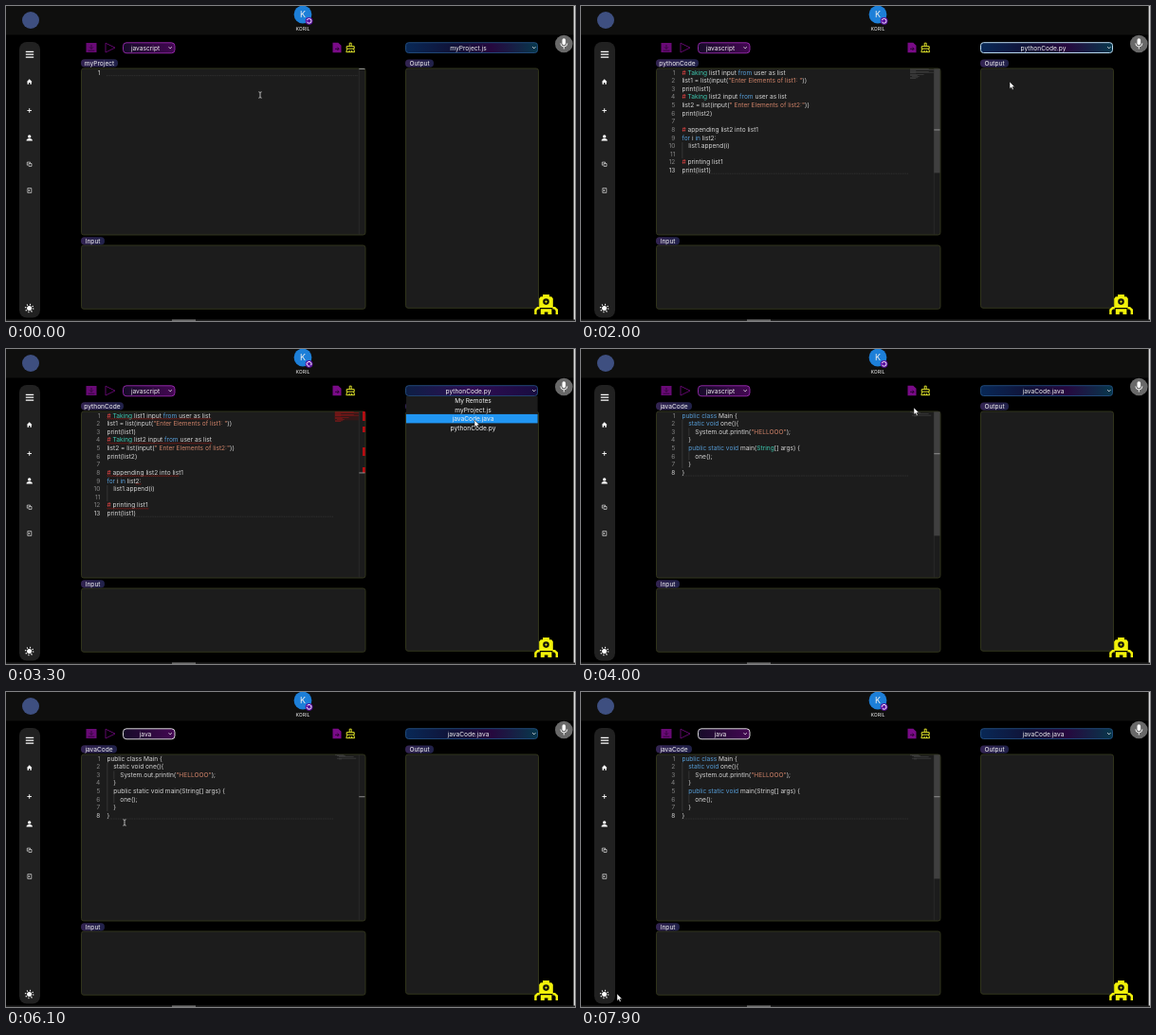
Write an HTML page that moves like this. It is 600 px wide and 333 px high and loops after 8 s.

```html
<!DOCTYPE html>
<html lang="en">
<head>
<meta charset="utf-8">
<title>Code editor</title>
<style>
html, body { margin: 0; width: 100%; height: 100%; overflow: hidden; background: #000; }
svg { display: block; width: 100%; height: 100%; }
text { font: 6.6px Inter, "Open Sans", sans-serif; fill: #f0f0f0; }
.mid { text-anchor: middle; }
.code text { font-size: 6.6px; fill: #d4d4d4; }
.code .num { text-anchor: end; font-size: 6.5px; fill: #858585; }
.code .now { fill: #d0d0d0; }
.k { fill: #569cd6; } .s { fill: #ce8268; } .e { fill: #f44747; } .t { fill: #3dc9b0; }
.panel { fill: #1c1c1c; stroke: #35381d; stroke-width: .9; }
.white { fill: #fff; }
.line { fill: none; stroke: #fff; stroke-width: .9; }
.thin { stroke-width: .6; }
</style>
</head>
<body>
<svg id="stage" viewBox="0 0 600 333" preserveAspectRatio="none">
  <defs>
    <linearGradient id="wide"><stop stop-color="#082856"/><stop offset=".35" stop-color="#101338"/><stop offset=".65" stop-color="#26083e"/><stop offset="1" stop-color="#07384c"/></linearGradient>
    <linearGradient id="wideOpen"><stop stop-color="#0d1f45"/><stop offset=".5" stop-color="#300d52"/><stop offset="1" stop-color="#180c40"/></linearGradient>
    <linearGradient id="small"><stop stop-color="#160b28"/><stop offset="1" stop-color="#430752"/></linearGradient>
    <linearGradient id="pill"><stop stop-color="#332452"/><stop offset="1" stop-color="#202149"/></linearGradient>
  </defs>
  <rect width="600" height="333"/>
  <rect width="600" height="30.5" fill="#0f0f0e"/>
  <path d="M599.3 0V333" stroke="#ddd" stroke-width="1.4"/>
  <path d="M0 332.2H600" stroke="#222" stroke-width="1.4"/>
  <path d="M175 332.2H200" stroke="#777" stroke-width="1.4"/>
  <circle cx="26" cy="15" r="9" fill="#3e4f80"/>

  <circle cx="313" cy="9" r="9.4" fill="#1d7fd8"/>
  <text class="mid" x="313" y="12.2" style="font-size:9px">K</text>
  <circle cx="319.6" cy="15.8" r="3.9" fill="#5c12a0"/>
  <g id="badge"><circle r="2.4" class="line" stroke-dasharray="6 1.5"/></g>
  <text class="mid" x="313" y="25.8" style="font-size:5.2px">KORIL</text>

  <rect x="14" y="38" width="22" height="291.5" rx="8" fill="#212121"/>
  <path class="line" d="M20.8 48.3h8.4M20.8 51.2h8.4M20.8 54.1h8.4" style="stroke-width:1.3"/>
  <path class="white" d="M21.8 80.2L24.7 77.3l2.9 2.9h-.8v2.6h-1.4v-1.8h-1.4v1.8h-1.4v-2.6z"/>
  <path class="line" d="M22.4 110.5h4.6M24.7 108.2v4.6"/>
  <circle class="white" cx="24.7" cy="137.9" r="1.7"/>
  <path class="white" d="M21.5 142.6q0-2.5 3.2-2.5t3.2 2.5z"/>
  <path class="line thin" d="M24 166.5h3v2.9h-3zM23.2 168.2h-.9v-3.1h3.2v.9"/>
  <path class="line thin" d="M22.8 194v-1.4h4v4.8h-4V196M21.8 195h3m-1-1l1 1-1 1"/>
  <circle class="white" cx="24.6" cy="319.5" r="2.5"/>
  <circle class="line" cx="24.6" cy="319.5" r="4" style="stroke-width:1.5" stroke-dasharray="1 2.14"/>

  <g fill="#690a76">
    <path d="M84.5 39h11v10h-11z"/>
    <path d="M90 41v4.2m-2-1.8l2 2 2-2M86.6 47.2h6.8" fill="none" stroke="#35053e" stroke-width="1"/>
    <path d="M105 39.2l10 4.9-10 4.9z" fill="none" stroke="#690a76" stroke-width=".9"/>
    <path d="M344.5 38.8h5.8l3.2 3v7.4h-9z" fill="#790b87"/>
    <path d="M347 45.3h4m-1.6-1.7l1.7 1.7-1.7 1.7" stroke="#240029" stroke-width=".9" fill="none"/>
  </g>
  <g fill="none" stroke="#dfe32b" stroke-width="1">
    <path d="M362.2 42.4v-3.2h2v3.2M359.2 45.1v-2.5h8v2.5zM359.8 45.1l-1 3.6h8.8l-1-3.6M362 48.8v-1.9M364.6 48.8v-1.9"/>
  </g>

  <rect class="panel" x="79.5" y="66" width="299.5" height="176" rx="2.5"/>
  <rect class="panel" x="79.5" y="253" width="299.5" height="67.3" rx="2.5"/>
  <rect class="panel" x="421.5" y="66" width="140" height="253.3" rx="2.5"/>
  <path d="M372.3 66.5v175" stroke="#303030" stroke-width=".7"/>
  <g id="code" class="code"></g>

  <rect id="tag" x="79" y="56.2" height="8.2" rx="4" fill="url(#pill)"/>
  <text id="tagText" class="mid" y="62.6"></text>
  <rect x="421" y="56.4" width="30" height="8.4" rx="4" fill="url(#pill)"/>
  <text class="mid" x="436" y="62.8">Output</text>
  <rect x="79" y="244.2" width="25" height="8.2" rx="4" fill="url(#pill)"/>
  <text class="mid" x="91.6" y="250.7">Input</text>

  <rect id="langBox" x="123.5" y="38.8" width="54.5" height="11" rx="3.5" fill="url(#small)"/>
  <text id="lang" class="mid" y="46.5" x="147"></text>
  <rect id="fileBox" x="421.5" y="38.7" width="139" height="10.8" rx="3"/>
  <text id="file" class="mid" y="46.5" x="487.5"></text>
  <path class="line" style="stroke-width:.8" d="M171.6 43.3l1.6 1.6 1.6-1.6M555.2 43.2l1.6 1.6 1.6-1.6"/>
  <g id="menu"></g>

  <circle cx="588.3" cy="40" r="9.3" fill="#696969"/>
  <rect class="white" x="586.5" y="34.3" width="3.6" height="7" rx="1.8"/>
  <path class="line" d="M584.8 39.4a3.5 3.5 0 0 0 7 0M588.3 43v2.5"/>

  <g fill="#f2f20a">
    <path d="M566 305h7v2.5h-7zM563.8 307.2h11.4l1.6 2v9.8h-14.6v-9.8z"/>
    <path d="M557.2 326v-5.2l3-2.8h2.6v2.6h-1.8l-1.4 1.4v4zM582 326v-5.2l-3-2.8h-2.6v2.6h1.8l1.4 1.4v4z"/>
    <path d="M563.8 320.2h11.6v5.8h-4v-2.6h-3.6v2.6h-4z"/>
    <circle cx="569.5" cy="312.6" r="3.3" fill="#16160a"/>
    <circle cx="569.5" cy="312.6" r="1.1"/>
  </g>

  <path id="arrow" d="M0 0v7.4l1.7-1.5 1.2 2.7 1.3-.6-1.2-2.6h2.4z" fill="#fff" stroke="#111" stroke-width=".5"/>
  <path id="beam" d="M-1.6-3.2q1.6 0 1.6 .8q0-.8 1.6-.8M0-2.4V2.4M-1.6 3.2q1.6 0 1.6-.8q0 .8 1.6 .8" fill="none" stroke="#ddd" stroke-width=".8"/>
</svg>
<script>
const LOOP = 8000, ROW = 8.63, TOP = 66;
const $ = id => document.getElementById(id);

// Lines: leading ">" is one indent; {k|word} marks a token class.
const PYTHON = [
  '{e|#} {t|Taking} list1 input {k|from} user as list',
  'list1 = list(input({s|"Enter Elements of list1: "}))',
  'print(list1)',
  '{e|#} {t|Taking} list2 input {k|from} user as list',
  'list2 = list(input({s|" Enter Elements of list2:"}))',
  'print(list2)', '',
  '{e|#} appending list2 into list1',
  '{k|for} i {k|in} list2:',
  '>list1.append(i)', '',
  '{e|#} printing list1',
  'print(list1)'
];
const JAVA = [
  '{k|public} {k|class} Main {',
  '>{k|static} {k|void} one(){',
  '>>System.out.println({s|"HELLOOO"});',
  '>}',
  '>{k|public} {k|static} {k|void} main({t|String}[] args) {',
  '>>one();',
  '>}',
  '}'
];
const plainJava = JAVA.map(l => l.replace(/\{[kt]\|(\w+)\}/g, '$1'));
const keywordJava = JAVA.map(l => l.replace('{t|String}', 'String'));

const empty = { lines: [''], marks: [], ruler: [], guides: '' };
const py = {
  lines: PYTHON, caret: 130.5, guides: 'M106.8 144v17',
  marks: [[0, 0, 38], [3, 0, 38], [7, 0, 26], [8, 13, 15], [11, 0, 16]],
  ruler: [[66, 10], [82, 6], [104, 9], [125, 6]]
};
const java = {
  caret: 110.3, guides: 'M106.8 75v51M113.8 83.5v8.5M113.8 109v8.5',
  marks: [[1, 7, 15], [4, 19, 39]], ruler: [[66, 12], [91, 6]]
};

// Editor content: start time, document, visible error marks, scrollbar height.
const editor = [
  [0, empty, false, 0],
  [1400, py, false, 110],
  [2300, py, true, 0],
  [3900, { ...java, lines: JAVA }, false, 131],
  [4400, { ...java, lines: JAVA }, true, 0],
  [5300, { ...java, lines: plainJava }, false, 0],
  [6500, { ...java, lines: keywordJava }, false, 131]
];
const files = [[0, 'myProject.js'], [1300, 'pythonCode.py'], [3700, 'javaCode.java']];
const tags = [[0, 'myProject', 39], [1400, 'pythonCode', 45], [3900, 'javaCode', 38]];
const langs = [[0, 'javascript'], [5200, 'java']];

const fileMenu = { x: 422, w: 138.6, cx: 492.5, fill: '#1c1c1c',
  items: ['My Remotes', 'myProject.js', 'javaCode.java', 'pythonCode.py'] };
const langMenu = { x: 123.5, w: 54.5, cx: 151.5, fill: '#2b0638',
  items: ['Language', 'javascript', 'C++', 'java', 'php', 'python'] };
const menus = [[0, null], [600, fileMenu], [1300, null], [2700, fileMenu],
  [3700, null], [4500, langMenu], [5200, null]];

const path = [
  [0, 268, 94], [150, 268, 94], [500, 492, 44], [700, 492, 47], [1000, 497, 84],
  [1400, 497, 84], [1850, 452, 80], [2150, 452, 80], [2550, 490, 45], [2800, 490, 47],
  [3150, 494, 75], [3750, 494, 75], [4300, 165, 45], [4500, 154, 46], [4750, 153, 94],
  [4850, 153, 94], [5100, 151, 83], [5400, 151, 83], [5950, 125, 138], [6500, 125, 138],
  [7200, 150, 170], [7800, 38, 319], [8000, 38, 319]
];

const at = (list, t) => list.findLast(e => e[0] <= t);
const rect = (x, y, w, h, fill, extra = '') =>
  `<rect x="${x}" y="${y}" width="${w}" height="${h}" fill="${fill}" ${extra}/>`;

function pointer(t) {
  const i = path.findLastIndex(p => p[0] <= t);
  const a = path[i], b = path[i + 1] || a;
  const u = b === a ? 0 : (t - a[0]) / (b[0] - a[0]);
  const e = u * u * (3 - 2 * u);
  return [a[1] + (b[1] - a[1]) * e, a[2] + (b[2] - a[2]) * e];
}

function minimap(lines, color) {
  return lines.map((line, i) => {
    const indent = line.match(/^>*/)[0].length;
    const width = line.replace(/\{\w\||[{}>]/g, '').length * .52;
    return width ? rect(347 + indent * 2, 66.6 + i * .82, width, .45, color) : '';
  }).join('');
}

function squiggle([row, from, to]) {
  const el = $('code').querySelectorAll('.row')[row];
  const n = el.getNumberOfChars();
  const x0 = el.getStartPositionOfChar(from).x;
  const x1 = el.getEndPositionOfChar(Math.min(to, n) - 1).x;
  let d = `M${x0} ${TOP + 7.4 + row * ROW}`;
  for (let x = x0, s = 1; x < x1; x += 1, s = -s) d += `l1 ${s * .7}`;
  return `<path d="${d}" fill="none" stroke="#c51a10" stroke-width=".5"/>`;
}

function drawCode([, doc, errors, bar]) {
  const last = doc.lines.length - 1;
  let out = `<path d="M106 ${TOP - 1 + (last + 1) * ROW}H${last ? 345 : 371}" stroke="#383838" stroke-width=".7" stroke-dasharray="1 .7"/>`;
  out += `<path d="${doc.guides}" stroke="#444" stroke-width=".6"/>`;
  doc.lines.forEach((line, i) => {
    const y = TOP + 6.5 + i * ROW;
    const depth = line.match(/^>*/)[0].length;
    const body = line.slice(depth).replace(/\{(\w)\|([^}]*)\}/g, '<tspan class="$1">$2</tspan>');
    out += `<text class="num ${i === last ? 'now' : ''}" x="99.3" y="${y}">${i + 1}</text>`;
    out += `<text class="row" x="${106.4 + depth * 6.9}" y="${y}">${body}</text>`;
  });
  if (bar) out += rect(372.3, 66.4, 6.2, bar, '#4b4b4b', 'opacity=".75"');
  out += minimap(doc.lines, errors ? '#b01a1a' : '#555');
  if (errors) {
    out += rect(346, 66.4, 26, doc === py ? 9 : 6, '#a00', 'opacity=".16"');
    out += doc.ruler.map(([y, h]) => rect(376, y, 2.8, h, '#b50d12')).join('');
  }
  out += rect(372.3, doc.caret || 66, 6.2, .9, '#999');
  $('code').innerHTML = out;
  if (errors) $('code').innerHTML += doc.marks.map(squiggle).join('');
}

function drawMenu(menu, y) {
  if (!menu) return '';
  const step = 9.5, first = 49.9;
  const hover = Math.floor((y - first) / step);
  return rect(menu.x, first, menu.w, menu.items.length * step, menu.fill) +
    menu.items.map((name, i) => {
      const top = first + i * step;
      return (i === hover ? rect(menu.x, top, menu.w, step, '#2196f3') : '') +
        `<text class="mid" x="${menu.cx}" y="${top + 7.3}">${name}</text>`;
    }).join('');
}

function border(box, color, width) {
  box.setAttribute('stroke', color);
  box.setAttribute('stroke-width', width);
}

let shown;
function render(t) {
  const state = at(editor, t);
  if (state !== shown) drawCode(shown = state);

  const [, tag, width] = at(tags, t);
  $('tag').setAttribute('width', width);
  $('tagText').setAttribute('x', 79 + width / 2);
  $('tagText').textContent = tag;
  $('file').textContent = at(files, t)[1];
  $('lang').textContent = at(langs, t)[1];

  const [x, y] = pointer(t);
  const menu = at(menus, t)[1];
  $('menu').innerHTML = drawMenu(menu, y + 2);
  $('fileBox').setAttribute('fill', `url(#${menu === fileMenu ? 'wideOpen' : 'wide'})`);
  const fileFocus = t >= 1300 && t < 2700;
  border($('fileBox'), fileFocus ? '#b9d8ef' : '#27568c', fileFocus ? 1 : .8);
  border($('langBox'), t >= 5200 ? '#eee' : '#9a2bb0', .9);

  const inBox = (top, bottom) => x > 80 && x < 372 && y > top && y < bottom;
  const typing = !menu && (inBox(66, 242) || inBox(253, 320));
  $('arrow').style.display = typing ? 'none' : '';
  $('beam').style.display = typing ? '' : 'none';
  $(typing ? 'beam' : 'arrow').setAttribute('transform', `translate(${x} ${y})`);
  $('badge').setAttribute('transform', `translate(319.6 15.8) rotate(${t * .18})`);
}

function tick() {
  render(performance.now() % LOOP);
  requestAnimationFrame(tick);
}
tick();
</script>
</body>
</html>
```
